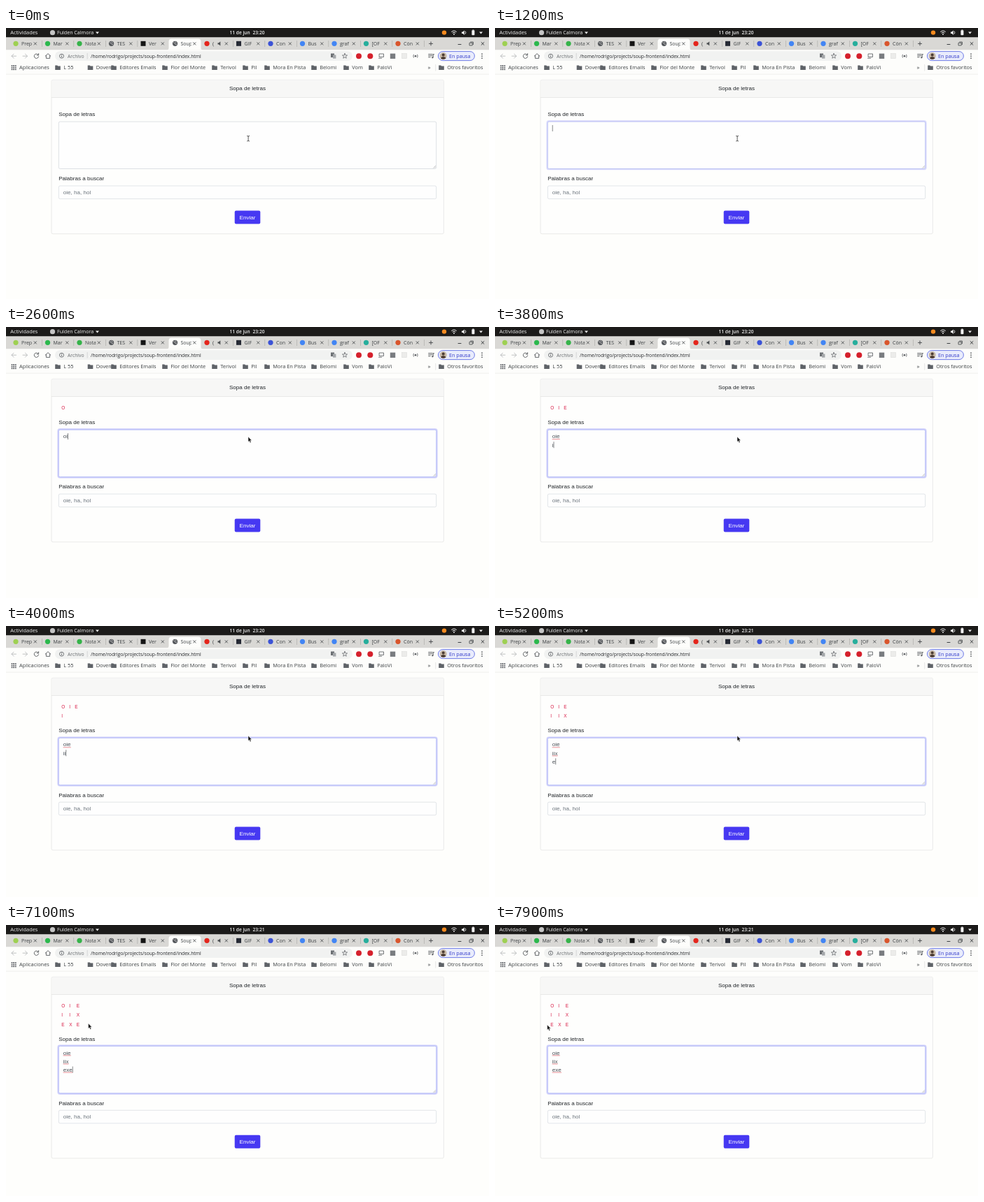
Recreate the animation shown at these times as an HTML page. Size 690 by 388 pixels, loop 8 s.

```html
<!DOCTYPE html>
<html lang="es">
<head>
<meta charset="utf-8">
<title>Sopa de letras</title>
<style>
  html, body { margin: 0; width: 100%; height: 100%; overflow: hidden; background: #fefefc; }
  svg { display: block; width: 690px; height: 388px; font-family: "Open Sans", "Noto Sans", sans-serif; }
  text { white-space: pre; }
  .page { font: 8.08px "Liberation Sans", Arial, sans-serif; fill: #212529; }
  .line { fill: none; stroke-linecap: round; stroke-linejoin: round; }
</style>
</head>
<body>
<svg id="stage" viewBox="0 0 690 388"></svg>
<script>
const LOOP = 8000, ROW = 13.1, BLINK = 580, FOCUS = 1080;
const stage = document.getElementById('stage');

const rect = (x, y, w, h, fill, more = '') =>
  `<rect x="${x}" y="${y}" width="${w}" height="${h}" fill="${fill}" ${more}/>`;
const dot = (x, y, r, fill, more = '') => `<circle cx="${x}" cy="${y}" r="${r}" fill="${fill}" ${more}/>`;
const label = (x, y, str, size, fill, more = '') =>
  `<text x="${x}" y="${y}" font-size="${size}" fill="${fill}" ${more}>${str}</text>`;
const line = (d, color, width = 0.9) => `<path class="line" d="${d}" stroke="${color}" stroke-width="${width}"/>`;
const shape = (d, fill) => `<path d="${d}" fill="${fill}"/>`;
const cross = (x, y, r, color, width) =>
  line(`M${x - r} ${y - r}l${2 * r} ${2 * r}m0 ${-2 * r}l${-2 * r} ${2 * r}`, color, width);
const folder = x =>
  shape(`M${x - 3.8} 53.6h3l1 1h3.6v5.4h-7.6z`, '#5f6368');
const globe = (x, y) => dot(x, y, 3.6, '#55585c') +
  line(`M${x - 2} ${y - 1.4}q1.6 .2 2 1.5t2 1M${x + 0.6} ${y - 2.4}l.8 1.2`, '#e4e4e2', 0.8);

function topBar() {
  const white = '#f2f2f2', bold = 'font-weight="600"';
  return rect(0, 0, 690, 13.5, '#1c1b1a') +
    label(6.3, 9.3, 'Actividades', 7.4, white) +
    dot(66.5, 6.7, 3.6, '#c4c4c4') +
    label(73, 9.3, 'Fulden Calmora', 7.1, white) +
    shape('M128 5.5h5l-2.5 3z', white) +
    label(319.6, 9.3, '11 de jun', 6.6, white, bold) +
    label(352.6, 9.3, '23:20', 6.6, white, bold + ' id="clock"') +
    dot(626, 6.6, 3.2, '#f58a1f') +
    line('M636.6 5.3q3.4-2.8 6.8 0M638 7q2-1.6 4 0', white, 1) + dot(640, 9, 0.9, white) +
    shape('M651 5.5h1.6l2.2-2v6.4l-2.2-2h-1.6z', white) + line('M656.3 4.8q1.4 1.8 0 3.6', white) +
    rect(665.4, 3.3, 4, 7, white, 'rx=".7"') + rect(666.4, 2.5, 2, 1, white) +
    shape('M676 5.5h5l-2.5 3z', white);
}

function tabs() {
  const names = ['Prep', 'Mar', 'Nota', 'TES', 'Ver', 'Soup', '(', 'GIF', 'Con', 'Bus', 'graf', '[OF', 'Cón'];
  const colors = ['#9ed052', '#2cb84d', '#36b34a', , '#151515', , '#e4251c', '#262a35', '#3c53d6',
    '#4285f4', '#4285f4', '#27ae9c', '#d9552c'];
  let out = rect(0, 13.5, 690, 18, '#d9d8d5') +
    shape('M229.5 31.5q3 0 3-3v-9q0-4 4-4h38q4 0 4 4v9q0 3 3 3z', '#fdfdfb') +
    '<clipPath id="clip" clipPathUnits="objectBoundingBox"><rect width="1" height="1"/></clipPath>';
  names.forEach((name, i) => {
    const x = 14 + 45.5 * i;
    out += i === 3 || i === 5 ? globe(x, 22.3)
      : i === 4 || i === 7 ? rect(x - 3.5, 18.8, 7, 7, colors[i])
      : dot(x, 22.3, 3.6, colors[i]);
    out += `<svg x="${x + 8}" y="14" width="15.5" height="17">${label(0, 11, name, 7, '#3c4043')}</svg>`;
    out += cross(x + 27.8, 22.4, 1.7, '#4a4d50', 0.9);
    if (i !== 4 && i !== 5) out += rect(x + 37, 18, 0.6, 9, '#a9a9a6');
  });
  return out +
    shape('M302.5 21.2h1.6l2.2-2v6.4l-2.2-2h-1.6z', '#4a4d50') +
    line('M604.5 22.4h5m-2.5-2.5v5', '#4a4d50', 1) +
    line('M646 23.5h4', '#3c4043', 1) +
    line('M662.4 21.3h3.8v3.6h-3.8zM663.6 20h3.8v3.6', '#3c4043', 0.8) +
    cross(681, 22.4, 1.9, '#3c4043', 1);
}

function toolbar() {
  const dark = '#55585c', pale = '#b8babc';
  const star = Array.from({ length: 10 }, (_, i) => {
    const r = i % 2 ? 1.6 : 3.8, a = Math.PI * (i / 5 - 0.5);
    return `${(484 + r * Math.cos(a)).toFixed(2)} ${(40.2 + r * Math.sin(a)).toFixed(2)}`;
  }).join('L');
  return rect(0, 31.5, 690, 34.5, '#fdfdfb') +
    line('M14.5 40.2h-6.5m3-3l-3 3 3 3', pale) +
    line('M24 40.2h6.5m-3-3l3 3-3 3', pale) +
    line('M46 38.3a3.2 3.2 0 1 0 .6 2.6M46.6 36.6v2.4h-2.4', dark) +
    line('M56.2 40.2l3.8-3.5 3.8 3.5M57.4 39.6v3.8h5.2v-3.8', dark) +
    rect(70, 33.2, 425, 13.8, '#f1f2f1', 'rx="6.9"') +
    dot(79.5, 40.2, 3, 'none', `stroke="${dark}" stroke-width=".8"`) +
    line('M79.5 40v1.6M79.5 38.5v.1', dark, 0.8) +
    label(88, 42.6, 'Archivo', 6.8, '#6a6d71') +
    rect(115.8, 36, 0.6, 8.5, '#c3c4c5') +
    label(121, 42.6, '/home/rodrigo/projects/soup-frontend/index.html', 6.76, '#27292c') +
    rect(464, 36.5, 5, 5.6, '#6b6f73') + rect(467, 38.5, 4.4, 5.2, '#a4a7aa') +
    line(`M${star}Z`, dark, 0.7) +
    dot(504, 40.2, 4, '#d5202c') + dot(520.3, 40.2, 4, '#d5202c') +
    line('M533.5 37h6v4.5h-6zM532.6 43.3h4', '#66696d') +
    rect(548.8, 36.6, 7.4, 7.4, '#797c80') +
    rect(565.5, 36.6, 7, 7, '#ececea', 'stroke="#dcdcda" stroke-width=".6"') +
    line('M582.3 38.2q-1 2 0 4M587.7 38.2q1 2 0 4', dark, 0.8) + dot(585, 40.2, 1.3, dark) +
    line('M603.6 37.6h5.4M603.6 39.7h5.4M603.6 41.8h2.6M610.2 37.8v4.4M610.2 37.8h1.4', dark, 0.9) +
    dot(609.2, 42.3, 1.1, dark) +
    rect(617.4, 33.6, 52, 13, '#e9ecfc', 'rx="6.5" stroke="#4c5be0" stroke-width=".8"') +
    dot(624.7, 40.1, 5, '#c8b9a6') + dot(624.7, 38.6, 2, '#4b3b33') +
    shape('M620.8 43.3q3.9-4.6 7.8 0-3.9 3.6-7.8 0z', '#4b3b33') +
    label(633, 42.6, 'En pausa', 7.2, '#3038c8') +
    [37.2, 40.2, 43.2].map(y => dot(680, y, 0.85, dark)).join('');
}

function bookmarks() {
  const items = [[74, 'L 55'], [120.5, 'Dovemi'], [154, 'Editores Emails'], [227, 'Flor del Monte'],
    [298, 'Terivol'], [342, 'Pil'], [373, 'Mora En Pista'], [440, 'Belomi'], [486, 'Vom'],
    [522, 'PaloVi'], [622, 'Otros favoritos']];
  const ink = '#3c4043';
  let out = '';
  for (let i = 0; i < 9; i++) out += rect(7.6 + i % 3 * 2.6, 53.2 + (i / 3 | 0) * 2.6, 1.8, 1.8, '#5f6368');
  out += label(19, 59.2, 'Aplicaciones', 7.45, ink);
  for (const [x, name] of items) out += folder(x) + label(x + 8.2, 59.2, name, 7.4, ink);
  return out + label(602.4, 59, '»', 8, ink) + rect(613.5, 52, 0.6, 9.5, '#d5d6d6') +
    rect(0, 65.8, 690, 0.6, '#e3e3e1');
}

function page() {
  const edge = 'stroke="#ced4da" stroke-width=".6"';
  return `<g class="page">
    <rect id="card" x="65" y="74.3" width="560.3" height="220.4" rx="2" fill="#fefefd" stroke="#dcdcdb" stroke-width=".6"/>
    ${shape('M65.3 99.3V76.4q0-1.8 1.8-1.8h556.1q1.8 0 1.8 1.8v22.9z', '#f7f7f6')}
    ${rect(65, 99.1, 560.3, 0.6, '#dcdcdb')}
    <text x="345" y="89.4" text-anchor="middle">Sopa de letras</text>
    <g id="letters" fill="#d81b45" font-size="6.46"></g>
    <g id="form">
      <text x="75.2" y="126.3">Sopa de letras</text>
      <rect id="glow" x="74.3" y="133.1" width="541.4" height="69.4" rx="2.6" fill="none" stroke="#4a50f5" stroke-width="1.7"/>
      <rect id="area" x="75.3" y="134.1" width="539.4" height="67.4" rx="2" fill="#fefefe" stroke-width=".7"/>
      ${line('M610.6 200.3l3-3M612.4 200.3l1.2-1.2', '#8a8d90', 0.5)}
      <g id="typed" fill="#495057"></g>
      <path id="caret" stroke="#33373b" stroke-width=".6"/>
      <text x="75.2" y="218.4">Palabras a buscar</text>
      ${rect(75.3, 226, 539.4, 18.6, '#fefefe', 'rx="2" ' + edge)}
      <text x="81.8" y="238.2" fill="#6c757d">oie, ha, hol</text>
      ${rect(326.7, 261.4, 36.6, 19, '#4638f2', 'rx="2"')}
      <text x="345" y="273.8" text-anchor="middle" fill="#fff">Enviar</text>
    </g></g>`;
}

const pointers = `<g id="beam">${line('M344.6 154.4q1.5 0 1.5 1 0-1 1.5-1M346.1 155.4v5.6M344.6 162q1.5 0 1.5-1 0 1 1.5 1', '#333', 0.8)}</g>
  <path id="arrow" d="M0 0v7.2l1.6-1.5 1.2 2.7 1.3-.6-1.2-2.6h2.2z" fill="#151515" stroke="#fff" stroke-width=".4"/>`;

stage.innerHTML = page() + topBar() + tabs() + toolbar() + bookmarks() + pointers;
const el = id => document.getElementById(id);
const [clock, card, letters, form, glow, area, typed, caret, beam, arrow] =
  ['clock', 'card', 'letters', 'form', 'glow', 'area', 'typed', 'caret', 'beam', 'arrow'].map(el);

// key press time, delay until the grid shows it, character
const keys = [[2500, 100, 'o'], [2600, 100, 'i'], [2800, 200, 'e'], [3500, 100, '\n'],
  [3800, 100, 'i'], [4000, 100, 'i'], [4200, 500, 'x'], [4800, 0, '\n'],
  [5200, 200, 'e'], [5500, 300, 'x'], [5720, 250, 'e']];
// when each word gets its spelling mark
const marked = [3500, 4800, 6700];
// time, x, y of the arrow tip
const path = [[0, 346, 157.3], [6400, 346, 157.3], [6500, 350, 162], [6700, 332, 160], [6900, 205, 150],
  [7100, 117.6, 141], [7300, 97, 120], [7500, 85, 108], [7700, 77, 120], [7900, 74.6, 143], [8000, 74.6, 143]];
const em = { O: 0.778, I: 0.278, E: 0.667, X: 0.667 };

function drawGrid(t) {
  const rows = keys.filter(k => t >= k[0] + k[1]).map(k => k[2]).join('').toUpperCase().split('\n').filter(Boolean);
  let x = 79.2, out = '';
  for (let c = 0; c < 3; c++) {
    let widest = 0;
    rows.forEach((row, r) => {
      if (!row[c]) return;
      widest = Math.max(widest, em[row[c]] * 6.46);
      out += `<text x="${x}" y="${118.3 + r * ROW}">${row[c]}</text>`;
    });
    x += widest + 6.1;
  }
  letters.innerHTML = out;
  const shift = rows.length * ROW;
  form.setAttribute('transform', `translate(0 ${shift})`);
  card.setAttribute('height', 220.4 + shift);
}

function drawTyping(t) {
  const done = keys.filter(k => t >= k[0]);
  const lines = done.map(k => k[2]).join('').split('\n');
  const base = i => 146.3 + i * 12.12;
  typed.innerHTML = lines.map((s, i) => `<text x="81.8" y="${base(i)}">${s}</text>`).join('');
  const widths = [...typed.children].map(n => n.getComputedTextLength());
  typed.innerHTML += widths.map((w, i) =>
    t >= marked[i] ? line(`M82 ${base(i) + 1.3}h${w - 0.4}`, '#e0626a', 0.7) : '').join('');
  const last = lines.length - 1;
  const since = t - (done.length ? done[done.length - 1][0] : FOCUS + 20);
  const on = since >= 0 && Math.floor(since / BLINK) % 2 === 0;
  caret.setAttribute('d', on ? `M${82.2 + widths[last]} ${base(last) - 7.3}v9` : '');
}

function drawFocus(t) {
  const p = Math.min(1, Math.max(0, (t - FOCUS) / 150));
  const mix = (a, b) => Math.round(a + (b - a) * p);
  area.setAttribute('stroke', `rgb(${mix(206, 157)},${mix(212, 166)},${mix(218, 245)})`);
  glow.setAttribute('stroke-opacity', 0.27 * p);
}

function drawPointer(t) {
  const i = path.findIndex(p => p[0] > t);
  const [a, b] = [path[i - 1], path[i]];
  const p = (t - a[0]) / (b[0] - a[0]);
  arrow.setAttribute('transform', `translate(${a[1] + (b[1] - a[1]) * p} ${a[2] + (b[2] - a[2]) * p})`);
  const moved = t >= 2600;
  beam.setAttribute('visibility', moved ? 'hidden' : 'visible');
  arrow.setAttribute('visibility', moved ? 'visible' : 'hidden');
}

let start;
function frame(now) {
  start ??= now;
  const t = Math.max(0, now - start) % LOOP;
  clock.textContent = t < 4100 ? '23:20' : '23:21';
  drawGrid(t);
  drawTyping(t);
  drawFocus(t);
  drawPointer(t);
  requestAnimationFrame(frame);
}
requestAnimationFrame(frame);
</script>
</body>
</html>
```
